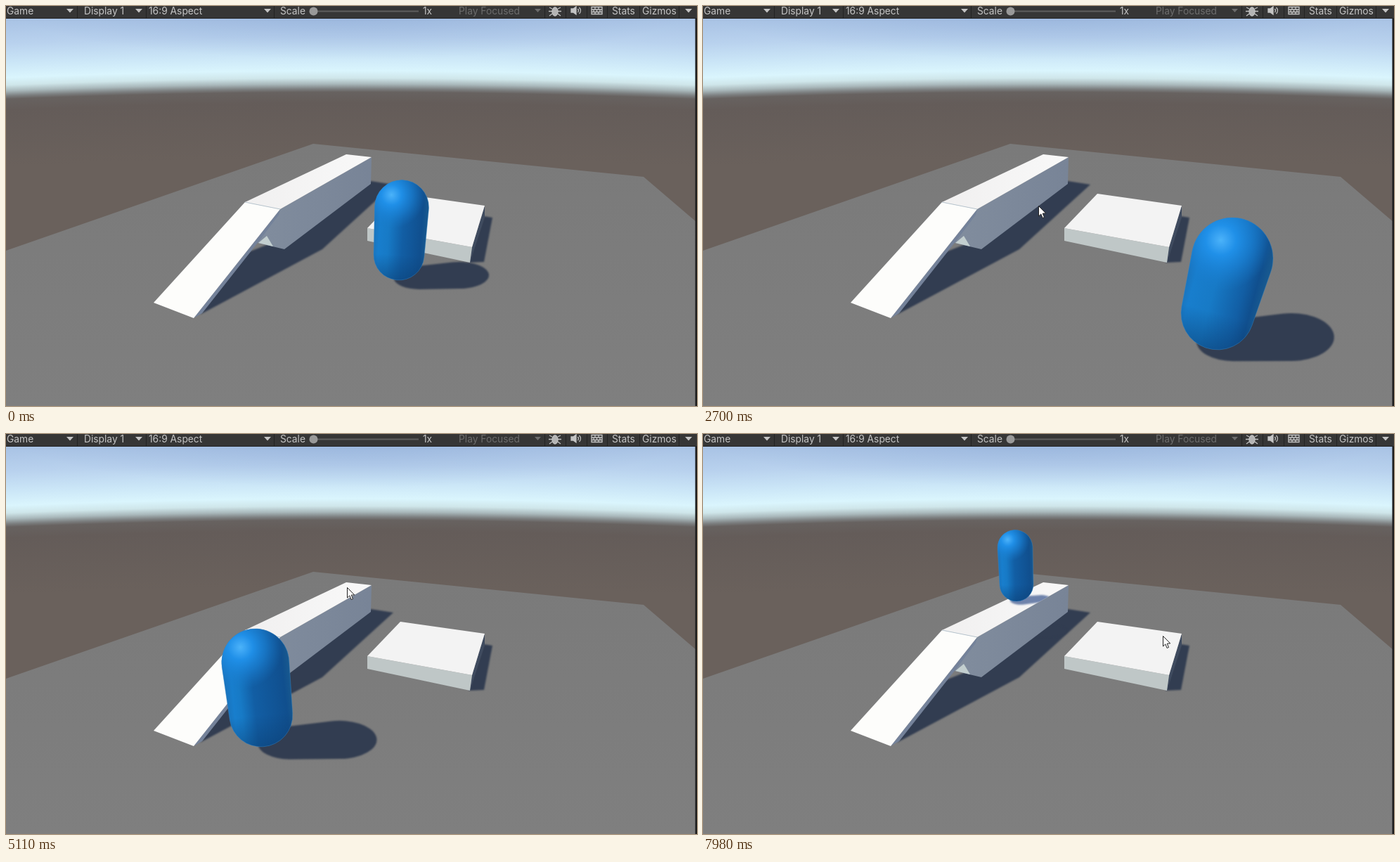
Write an HTML page with a canvas that moves like this. It is 983 px wide and 569 px high and loops after 8 s.

```html
<!DOCTYPE html>
<html lang="en">
<head>
<meta charset="utf-8">
<title>Capsule on a ramp</title>
<style>
  html, body { margin: 0; width: 100%; height: 100%; overflow: hidden; background: #7c7c7c; }
  canvas, svg { position: absolute; left: 0; top: 0; display: block; }
  text { font: 13.8px Inter, Roboto, sans-serif; fill: #c4c4c4; }
  .dim { fill: #6c6c6c; }
</style>
</head>
<body>
<canvas id="view" width="983" height="569"></canvas>
<svg width="983" height="18" viewBox="0 0 983 18">
  <rect width="983" height="18" fill="#363636"/>
  <path d="M0 17.5H983M101.500 0V17M199.500 0V17M381.500 0V17M766.500 0V17M796.500 0V17M826.500 0V17M855.500 0V17M901.500 0V17M957.500 0V17" stroke="#232323" fill="none"/>
  <text x="1" y="11.500">Game</text>
  <text x="111" y="11.500">Display 1</text>
  <text x="203" y="11.500">16:9 Aspect</text>
  <text x="390" y="11.500">Scale</text>
  <text x="593" y="11.500">1x</text>
  <text x="644" y="11.500" class="dim">Play Focused</text>
  <text x="862" y="11.500">Stats</text>
  <text x="905" y="11.500">Gizmos</text>
  <path d="M86 4h10l-5 5.500zM184 4h10l-5 5.500zM367 4h10l-5 5.500zM966 4h10l-5 5.500z" fill="#c4c4c4"/>
  <path d="M752 4h9l-4.500 5z" fill="#6c6c6c"/>
  <path d="M437 7.500H587" stroke="#5e5e5e" stroke-width="2"/>
  <circle cx="437.500" cy="7.500" r="6" fill="#999"/>
  <g stroke="#c4c4c4" fill="none" stroke-width="1.300">
    <path d="M773 2l4 2M789 2l-4 2M772 7.500h18M773 14l4-3M789 14l-4-3"/>
    <ellipse cx="781" cy="8" rx="4" ry="6" fill="#b4b4b4"/>
    <path d="M804 4h3l4-3v11l-4-3h-3z" fill="#c4c4c4"/>
    <path d="M813.500 4q2 2.500 0 5M815.500 2q4 4.500 0 9"/>
    <path d="M833 1.500h15v10h-15zM833 5h15M833 8.500h15M838 1.500v3.500M843 1.500v3.500M836 5v3.500M840.500 5v3.500M845 5v3.500M838 8.500v3M843 8.500v3"/>
  </g>
</svg>
<script>
const LOOP = 8000;
const ctx = document.getElementById('view').getContext('2d');

// time, top cap x y r, bottom cap x y r, lit share, ground shadow tip x y
const POSES = [
  [1080, 563, 286, 38.5, 559, 354, 36, .55, 645, 383],
  [1880, 702, 337, 52, 687, 412, 47.5, .66, 785, 448],
  [2140, 753, 359, 58, 732, 437, 52, .75, 837, 471],
  [3800, 753, 359, 58, 732, 437, 52, .75, 837, 471],
  [3870, 741, 355, 57, 721, 433, 51, .75, 825, 469],
  [4080, 688, 351, 56, 672, 428, 50, .68, 779, 465],
  [5110, 355, 325, 48, 363, 400, 45, .42, 475, 435],
  [5750, 203, 305, 48.5, 224, 372, 45, .36, 345, 416],
  [6130, 203, 305, 48.5, 224, 372, 45, .36, 345, 416],
  [6230, 210, 295, 48, 230, 360, 44, .37, 350, 406],
  [6550, 246, 260, 42, 262, 326, 39, .4, 402, 381],
  [6970, 324.5, 199.500, 36.5, 335.5, 266, 34, .44, 473, 348],
  [7370, 380, 175, 30, 387, 234, 28.5, .45, 490, 310],
  [7980, 444, 161.500, 25, 446, 214, 24, .46, 490, 280]
];

// time, near x y r, far x y r, flatness
const RAMP_SHADOW = [
  [5110, 403, 440, 32, 475, 435, 50, .6],
  [5750, 250, 415, 32, 315, 405, 52, .62],
  [6130, 250, 415, 32, 315, 405, 52, .62],
  [6230, 258, 404, 32, 325, 388, 56, .64],
  [6970, 358, 302, 26, 385, 293, 24, .6],
  [7370, 405, 268, 20, 438, 258, 19, .48],
  [7980, 452, 237, 15, 481, 234, 13, .38]
];

const CURSOR = [
  [220, 728, 541], [450, 717, 500], [680, 724, 475], [870, 724, 474],
  [1960, 724, 474], [2700, 477, 284], [2900, 485, 240], [3080, 485, 218],
  [5760, 485, 218], [6230, 531, 263], [6540, 562, 326], [6970, 581, 381],
  [7370, 582, 396], [7560, 596, 400], [7980, 654, 287]
];

const RAMP = [340, 279, 390, 289, 267, 444, 210, 422];
const RAMP_AND_TOP = [340, 279, 484, 211, 520, 215, 390, 289, 267, 444, 210, 422];

function sample(keys, t) {
  const i = keys.findIndex(k => k[0] > t);
  if (i < 0) return keys[keys.length - 1].slice(1);
  if (i === 0) return keys[0].slice(1);
  const a = keys[i - 1], b = keys[i], f = (t - a[0]) / (b[0] - a[0]);
  return a.slice(1).map((v, j) => v + (b[j + 1] - v) * f);
}

function ramp(gradient, ...stops) {
  stops.forEach(([at, color]) => gradient.addColorStop(at, color));
  return gradient;
}

function trace(pts) {
  ctx.beginPath();
  for (let i = 0; i < pts.length; i += 2) ctx.lineTo(pts[i], pts[i + 1]);
  ctx.closePath();
}

function poly(pts, fill) {
  trace(pts);
  ctx.fillStyle = fill;
  ctx.fill();
}

// Outline around two circles, optionally flattened vertically.
function hull(x1, y1, r1, x2, y2, r2, flat = 1) {
  const dx = x2 - x1, dy = (y2 - y1) / flat;
  const a = Math.atan2(dy, dx);
  const p = Math.acos(Math.max(-1, Math.min(1, (r1 - r2) / Math.hypot(dx, dy))));
  ctx.save();
  ctx.scale(1, flat);
  ctx.beginPath();
  ctx.arc(x1, y1 / flat, r1, a + p, a - p + 2 * Math.PI);
  ctx.arc(x2, y2 / flat, r2, a - p, a + p);
  ctx.closePath();
  ctx.restore();
}

function drawBackdrop() {
  const cy = 12130;
  ctx.fillStyle = ramp(ctx.createRadialGradient(490, cy, cy - 218, 490, cy, cy - 8),
    [0, '#6a615c'], [.38, '#645c59'], [.455, '#676260'], [.477, '#7c7f80'],
    [.51, '#a9b8bb'], [.55, '#cfe6ea'], [.6, '#daf5fd'], [.7, '#cbe6f7'],
    [.83, '#b9d2ee'], [1, '#a8c2e4']);
  ctx.fillRect(0, 0, 983, 569);
  ctx.save();
  ctx.translate(490, 8);
  ctx.scale(7, 1);
  ctx.fillStyle = ramp(ctx.createRadialGradient(0, 0, 0, 0, 0, 68),
    [0, 'rgba(125,155,205,.4)'], [1, 'rgba(125,155,205,0)']);
  ctx.fillRect(-70, 0, 141, 80);
  ctx.restore();
  poly([0, 348, 437, 196, 907, 243, 983, 308, 983, 569, 0, 569],
    ramp(ctx.createLinearGradient(0, 196, 0, 569), [0, '#7a7a7a'], [1, '#7f7f7f']));
}

function drawGroundShadows(pose) {
  const shade = '#323d51';
  const r = pose[5], x = pose[7], y = pose[8];
  const flat = (.53 + (y - 383) * .0014) / 1.17;
  ctx.save();
  ctx.filter = 'blur(0.8px)';
  poly([519, 249, 551, 254, 450, 346, 276, 439, 345, 350, 396, 330], shade);
  poly([680, 299, 692, 301, 680, 364, 658, 365], shade);
  hull(x - 1.6 * r, y + .1 * r, r, x, y, 1.17 * r, flat);
  ctx.fill();
  ctx.restore();
}

function drawBlocks() {
  poly([358, 337, 390, 289, 520, 215, 519, 253, 396, 346],
    ramp(ctx.createLinearGradient(370, 0, 520, 0), [0, '#808c9d'], [1, '#788497']));
  poly([359, 337, 371, 327, 380, 342], '#c3cfcf');
  poly([340, 279, 484, 211, 520, 215, 390, 289],
    ramp(ctx.createLinearGradient(350, 0, 510, 0), [0, '#f1f0f0'], [1, '#f8f8f8']));
  poly([390, 289, 388, 297, 361, 333, 279, 437, 267, 444], '#74829a');
  poly(RAMP, '#fdfdfb');
  ctx.beginPath();
  ctx.moveTo(340, 279);
  ctx.lineTo(390, 289);
  ctx.strokeStyle = '#b9c6d0';
  ctx.lineWidth = 1;
  ctx.stroke();

  poly([681, 284, 663, 343, 660, 365, 681, 300], '#3f4b5f');
  poly([514, 316, 663, 343, 660, 365, 514, 334], '#bfc7c7');
  poly([561, 267, 681, 284, 663, 343, 514, 316], '#f3f3f3');
}

function drawRampShadow(t) {
  if (t < 5110) return;
  ctx.save();
  trace(RAMP_AND_TOP);
  ctx.clip();
  hull(...sample(RAMP_SHADOW, t));
  ctx.filter = 'blur(0.8px)';
  ctx.fillStyle = '#6f83ab';
  ctx.fill();
  ctx.restore();
}

function drawCapsule([tx, ty, tr, bx, by, br, lit]) {
  const len = Math.hypot(bx - tx, by - ty);
  const nx = (by - ty) / len, ny = (tx - bx) / len;
  const cx = (tx + bx) / 2, cy = (ty + by) / 2, r = (tr + br) / 2;
  hull(tx, ty, tr, bx, by, br);
  ctx.fillStyle = ramp(
    ctx.createLinearGradient(cx - nx * r, cy - ny * r, cx + nx * r, cy + ny * r),
    [0, '#1a74bd'], [.1, '#187ecd'], [lit * .5, '#177ac6'], [lit, '#125ea4'],
    [.9, '#104f8e'], [1, '#17588f']);
  ctx.fill();

  ctx.fillStyle = ramp(ctx.createLinearGradient(bx, by, bx - ny * br, by + nx * br),
    [0, 'rgba(10,60,112,0)'], [1, 'rgba(10,60,112,.5)']);
  ctx.fill();

  const hx = tx + tr * (-.28 - (.75 - lit) * .5), hy = ty - tr * .45;
  ctx.fillStyle = ramp(ctx.createRadialGradient(hx, hy, 0, hx, hy, tr * 1.25),
    [0, '#4bb3f9'], [.12, '#3aa4f3'], [.3, 'rgba(32,145,234,.95)'],
    [.6, 'rgba(27,132,217,.65)'], [1, 'rgba(24,120,200,0)']);
  ctx.fill();

  ctx.strokeStyle = 'rgba(60,135,195,.4)';
  ctx.lineWidth = 1;
  ctx.stroke();
}

function drawCursor(t) {
  if (t < 220) return;
  const [x, y] = sample(CURSOR, t);
  ctx.save();
  ctx.translate(Math.round(x) + .5, Math.round(y) + .5);
  trace([0, 0, 0, 14.5, 3.3, 11.4, 5.6, 17, 8, 16, 5.7, 10.6, 10.2, 10.4]);
  ctx.fillStyle = '#fff';
  ctx.strokeStyle = '#222';
  ctx.lineWidth = 1;
  ctx.fill();
  ctx.stroke();
  ctx.restore();
}

function frame() {
  const t = performance.now() % LOOP;
  const pose = sample(POSES, t);
  drawBackdrop();
  drawGroundShadows(pose);
  drawBlocks();
  drawRampShadow(t);
  drawCapsule(pose);
  drawCursor(t);
  ctx.fillStyle = '#1c1c1c';
  ctx.fillRect(980.5, 0, 3, 569);
  requestAnimationFrame(frame);
}

frame();
</script>
</body>
</html>
```
